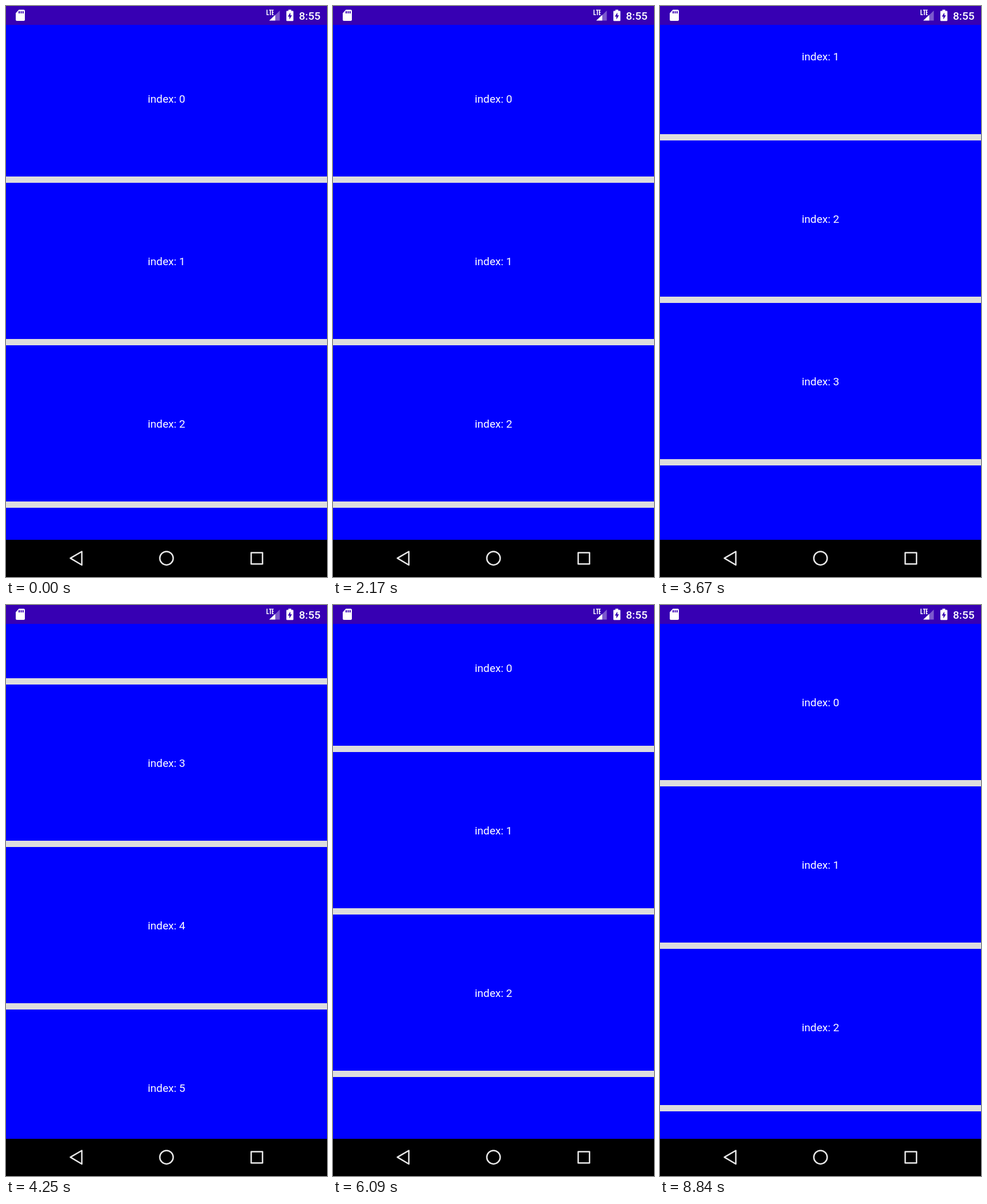
Write an HTML page that moves like this. It is 561 px wide and 998 px high and loops after 8.89 s.

```html
<!DOCTYPE html>
<html lang="en">
<head>
<meta charset="utf-8">
<title>Scrolling list</title>
<style>
  html, body { margin: 0; width: 100%; height: 100%; overflow: hidden; background: #000; }
  svg { display: block; width: 561px; height: 998px; }
  text { font-family: Roboto, sans-serif; font-size: 19.1px; fill: #fff; }
</style>
</head>
<body>
<svg viewBox="0 0 561 998">
  <rect y="33" width="561" height="900" fill="#ddd"/>
  <g id="list"></g>

  <rect width="561" height="33" fill="#3700b3"/>
  <g fill="#fff">
    <path fill-rule="evenodd" d="M22.5 6.5H31q2 0 2 2V24q0 2-2 2H19q-2 0-2-2V12.5z
      M22 9v4h2V9z M25.4 9v4h2V9z M28.8 9v4h2V9z"/>
    <path d="M456.2 6.5v8.7h3.3M459.8 7.3h4.6M462.1 7.3v8.7M467.6 7.3h-2v7.9h2M465.6 11.1h1.8"
      fill="none" stroke="#fff" stroke-width="1.6"/>
    <path d="M470 16.5 478.5 8v17.5H470z" fill-opacity=".35"/>
    <path d="M460 25.5 470.5 15.5v10z"/>
    <path fill-rule="evenodd" d="M493.5 6.5h5V8.5H501q1.300 0 1.300 1.300V25q0 1.300-1.300 1.300H491.300q-1.300 0-1.300-1.300V9.800q0-1.300 1.300-1.300h2.200z
      M497 11.500 492.500 18.500H495.300V23.500L499.800 16.300H497z"/>
    <text x="512" y="24" font-weight="500">8:55</text>
  </g>

  <rect y="933" width="561" height="65"/>
  <g fill="none" stroke="#e8e8e8" stroke-width="2.5" stroke-linejoin="round">
    <path d="M112.500 965.200 132.500 953.500V977z"/>
    <circle cx="280.500" cy="965.200" r="11.700"/>
    <rect x="428.500" y="955.500" width="19.800" height="19.800"/>
  </g>
</svg>
<script>
const LOOP = 8890, PITCH = 284, ITEM_HEIGHT = 273, LIST_TOP = 33;
const list = document.getElementById('list');

// [time in ms, scroll offset in px]
const scrollKeys = [
  [0, 8], [3110, 8], [3320, 62], [3670, 365], [3980, 620], [4300, 757], [4700, 803],
  [5760, 803], [5890, 580], [6000, 245], [6090, 61], [6220, 0], [LOOP, 0]
];

for (let i = 0; i < 7; i++) {
  const top = LIST_TOP + i * PITCH;
  list.innerHTML += `<rect y="${top}" width="561" height="${ITEM_HEIGHT}" fill="#00f"/>
    <text x="280.5" y="${top + 144}" text-anchor="middle">index: ${i}</text>`;
}

const slope = (a, b) => (b[1] - a[1]) / (b[0] - a[0]);

// Harmonic mean of neighbouring slopes keeps the curve free of overshoot.
function tangent(i) {
  if (i === 0 || i === scrollKeys.length - 1) return 0;
  const before = slope(scrollKeys[i - 1], scrollKeys[i]);
  const after = slope(scrollKeys[i], scrollKeys[i + 1]);
  return before * after > 0 ? 2 * before * after / (before + after) : 0;
}

function scrollAt(time) {
  const i = scrollKeys.findIndex(key => key[0] > time) - 1;
  const [t0, y0] = scrollKeys[i], [t1, y1] = scrollKeys[i + 1];
  const span = t1 - t0, u = (time - t0) / span, v = 1 - u;
  return v * v * (1 + 2 * u) * y0 + u * u * (3 - 2 * u) * y1
    + span * u * v * (v * tangent(i) - u * tangent(i + 1));
}

function draw() {
  const offset = Math.round(scrollAt(performance.now() % LOOP));
  list.setAttribute('transform', `translate(0 ${-offset})`);
  requestAnimationFrame(draw);
}
draw();
</script>
</body>
</html>
```
